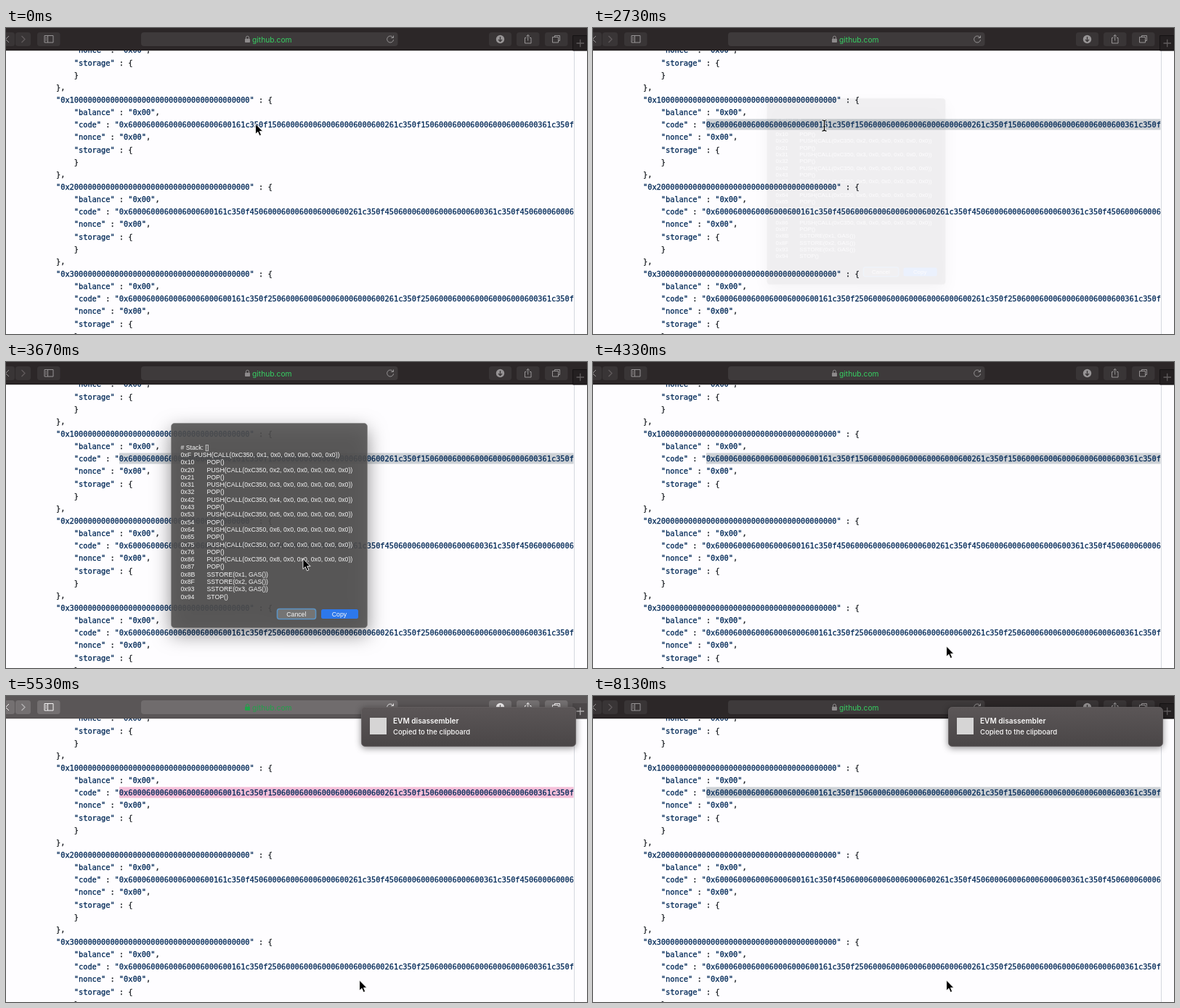
Recreate the animation shown at these times as an HTML page. Size 800 by 422 pixels, loop 8.19 s.

```html
<!DOCTYPE html>
<html lang="en">
<head>
<meta charset="utf-8">
<title>EVM disassembler</title>
<style>
html, body { margin: 0; width: 100%; height: 100%; overflow: hidden; background: #fefdff; }
svg { display: block; }
text { white-space: pre; }
svg {
  --bar: #2c2728; --button: #393536; --field: #3e3a3b; --icon: #979495; --edge: #151213;
  --faint: #605c5d; --url: #36cf62; --lock: #8d8a8b; --cell: #242021; --mark: #cdd1d5;
}
svg.active {
  --bar: #5a5657; --button: #747071; --field: #706c6d; --icon: #f6f4f5; --edge: #4b4748;
  --faint: #b5b2b3; --url: #22a14a; --lock: #22a14a; --cell: #4c4849; --mark: #f5bfd9;
}
.code { font: 10.3px "DejaVu Sans Mono", "Noto Sans Mono", monospace; fill: #1d2126; stroke: #1d2126; stroke-width: .3; }
.str { fill: #032a58; stroke: #032a58; }
.ui { font-family: Inter, "Liberation Sans", sans-serif; }
.asm { font: 8.71px "Liberation Sans", Arial, sans-serif; fill: #f7f7f7; }
.url { font-size: 10.28px; fill: var(--url); }
.btn { fill: var(--button); }
.line { fill: none; stroke: var(--icon); stroke-width: 1; }
.faint { fill: none; stroke: var(--faint); stroke-width: 1.3; }
#mark { fill: var(--mark); }
#dialog { filter: drop-shadow(0 9px 13px rgba(0,0,0,.5)); transform-origin: 362px 225px; }
#notice { filter: drop-shadow(0 2px 5px rgba(0,0,0,.45)); }
</style>
</head>
<body>
<svg id="stage" width="800" height="422" viewBox="0 0 800 422">
  <defs>
    <clipPath id="page"><rect y="31" width="781.500" height="391"/></clipPath>
    <linearGradient id="gray" x2="0" y2="1">
      <stop stop-color="#5b5657"/><stop offset="1" stop-color="#4a4647"/>
    </linearGradient>
    <path id="beamShape" d="M-2.800 -7.500Q0 -7.500 0 -5.500Q0 -7.500 2.800 -7.500M0 -5.500V5.500M-2.800 7.500Q0 7.500 0 5.500Q0 7.500 2.800 7.500M-1.500 1.500H1.500"/>
  </defs>
  <rect width="800" height="422" fill="#fefdff"/>
  <g clip-path="url(#page)">
    <rect id="mark" x="156" y="125.5" width="626" height="15"/>
    <g id="code" class="code"></g>
  </g>
  <path d="M782.5 31V422" stroke="#d5d8de"/>

  <g id="toolbar">
    <rect width="800" height="31" fill="var(--bar)"/>
    <path d="M780.5 31V10.5H800V31Z" fill="var(--cell)" stroke="var(--edge)"/>
    <path d="M0 30.7H800" stroke="var(--edge)" stroke-width="1"/>
    <g class="btn">
      <rect x="-12" y="6" width="24" height="19" rx="3.5"/>
      <rect x="13" y="6" width="21" height="19" rx="3.5"/>
      <rect x="43" y="6" width="31.500" height="19" rx="3.5"/>
      <rect x="665" y="6" width="31" height="19" rx="3.5"/>
      <rect x="703" y="6" width="31.500" height="19" rx="3.5"/>
      <rect x="742" y="6" width="31.500" height="19" rx="3.5"/>
    </g>
    <rect x="186" y="6" width="353.500" height="19" rx="4" fill="var(--field)"/>
    <path class="line" d="M4 11L-.5 15.500L4 20"/>
    <path class="faint" d="M21.500 11L26 15.500L21.500 20M785.500 21H796M790.700 15.700V26.300"/>
    <path class="line" d="M53 10.500H65V20H53ZM57.500 10.500V20M54.500 13H56M54.500 15H56M54.500 17H56"/>
    <circle cx="680.500" cy="15.500" r="5.700" fill="var(--icon)"/>
    <path d="M680.500 12V18M678 16L680.500 18.600L683 16" fill="none" stroke="var(--button)" stroke-width="1.300"/>
    <path class="line" d="M716.500 13.500H714.500V21H723V13.500H721M718.700 17.500V9.500M716.400 11.700L718.700 9.400L721 11.700"/>
    <path class="line" d="M755.500 12.500V10.500H762.500V17.500H760.500M752.500 12.500H760.500V20H752.500Z"/>
    <path class="line" d="M533 13.200A4.500 4.500 0 1 0 533.600 16.200M533.500 10.500V13.500H530.300"/>
    <rect x="329" y="14.800" width="7" height="5.200" rx=".8" fill="var(--lock)"/>
    <path d="M330.500 15V13.200A2 2 0 0 1 334.500 13.200V15" fill="none" stroke="var(--lock)"/>
    <text class="ui url" x="339" y="19.500">github.com</text>
  </g>

  <g id="dialog">
    <rect x="227.500" y="84.500" width="270" height="282" rx="4.500" fill="rgba(80,79,79,.88)" stroke="rgba(130,130,130,.6)"/>
    <g id="asm" class="asm"></g>
    <rect x="373.500" y="340.500" width="53" height="14" rx="3" fill="#747474" stroke="#5b93c4" stroke-width="1.600"/>
    <rect x="434" y="341" width="51" height="13" rx="2.500" fill="#2d78ec"/>
    <g class="asm" text-anchor="middle">
      <text x="399.800" y="350.600">Cancel</text>
      <text x="459" y="350.600">Copy</text>
    </g>
  </g>

  <g id="notice">
    <rect x="489.500" y="15.500" width="295" height="54" rx="5" fill="url(#gray)" stroke="#686364" stroke-width=".8"/>
    <rect x="501" y="30" width="23" height="23" fill="#d6d5d5"/>
    <g class="ui" fill="#fbfafa">
      <text x="533" y="38" font-size="10.080" font-weight="600">EVM disassembler</text>
      <text x="533" y="53.300" font-size="9.500" font-weight="500">Copied to the clipboard</text>
    </g>
  </g>

  <path id="arrow" d="M0 0V14.300L3.300 11.300L5.500 16.600L8 15.500L5.800 10.400H10.200Z" fill="#000" stroke="#fff" stroke-width=".9"/>
  <g id="beam" fill="none" stroke-linecap="round">
    <use href="#beamShape" stroke="#fff" stroke-width="2.600"/>
    <use href="#beamShape" stroke="#000" stroke-width="1.200"/>
  </g>
</svg>
<script>
const LOOP = 8190, LEFT = 69, CHAR = 6.2, LINE = 17.143;
const $ = id => document.getElementById(id);
const SVG = 'http://www.w3.org/2000/svg';

function addText(parent, x, y, str) {
  const el = document.createElementNS(SVG, 'text');
  el.setAttribute('x', x);
  el.setAttribute('y', y);
  parent.append(el);
  str.split(/("[^"]*"?)/).forEach(part => {
    if (!part) return;
    const span = document.createElementNS(SVG, 'tspan');
    if (part[0] === '"') span.setAttribute('class', 'str');
    span.textContent = part;
    el.append(span);
  });
}

// Bytecode: zero arguments, then a call with the running number.
function bytecode(zeros, op) {
  let s = '0x';
  for (let i = 1; i <= 8; i++) s += '6000'.repeat(zeros) + '600' + i + '61c350' + op + '50';
  return s.slice(0, 101);
}

function account(n, zeros, op) {
  return [
    `"0x${n}${'0'.repeat(39)}" : {`,
    '    "balance" : "0x00",',
    `    "code" : "${bytecode(zeros, op)}`,
    '    "nonce" : "0x00",',
    '    "storage" : {',
    '    }',
    '},'
  ];
}

[...account(0, 5, 'f1').slice(3), ...account(1, 5, 'f1'),
 ...account(2, 4, 'f4'), ...account(3, 5, 'f2')].forEach((row, i) => {
  const indent = row.search(/\S/);
  addText($('code'), LEFT + indent * CHAR, 34.4 + i * LINE, row.trim());
});

// Disassembly listing
const hex = n => '0x' + n.toString(16).toUpperCase();
const listing = [];
for (let k = 1; k <= 8; k++) {
  const at = 15 + 17 * (k - 1);
  listing.push([at, `PUSH(CALL(0xC350, ${hex(k)}${', 0x0'.repeat(5)}))`], [at + 1, 'POP()']);
}
for (let k = 1; k <= 3; k++) listing.push([0x87 + 4 * k, `SSTORE(${hex(k)}, GAS())`]);
listing.push([0x94, 'STOP()']);

addText($('asm'), 240.5, 120.6, '# Stack: []');
listing.forEach(([at, op], i) => {
  const y = 130.9 + i * 10.3;
  addText($('asm'), 240.5, y, hex(at));
  addText($('asm'), i ? 276.5 : 258.7, y, op);
});

// Cursor stops: time, x, y
const path = [
  [0, 343.5, 132], [350, 343.5, 132], [750, 318.5, 134.5], [3480, 318.5, 134.5],
  [3800, 459, 347], [3900, 459, 347], [4200, 486.7, 392], [LOOP, 486.7, 392]
];

const ramp = (t, a, b) => Math.min(1, Math.max(0, (t - a) / (b - a)));
const ease = p => p * p * (3 - 2 * p);
const within = (t, a, b) => t >= a && t < b;
const show = (el, on) => { el.style.display = on ? '' : 'none'; };

function cursorAt(t) {
  const i = path.findIndex(p => p[0] > t);
  const [t0, x0, y0] = path[i - 1], [t1, x1, y1] = path[i];
  const p = ease(ramp(t, t0, t1));
  return [x0 + (x1 - x0) * p, y0 + (y1 - y0) * p];
}

function draw(t) {
  $('stage').classList.toggle('active', within(t, 800, 2700) || within(t, 4470, 7400));
  show($('mark'), t >= 1130);

  const grow = ease(ramp(t, 2700, 2870));
  const fade = 1 - ramp(t, 3930, 4070);
  show($('dialog'), within(t, 2700, 4070));
  $('dialog').style.opacity = grow * fade;
  $('dialog').style.transform = `scale(${0.9 + 0.1 * grow})`;

  show($('notice'), t >= 4700);
  const slide = 1 - Math.pow(1 - ramp(t, 4700, 5060), 3);
  $('notice').setAttribute('transform', `translate(${320 * (1 - slide)} 0)`);

  const beam = within(t, 750, 3490);
  show($('beam'), beam);
  show($('arrow'), !beam);
  const [x, y] = cursorAt(t);
  $(beam ? 'beam' : 'arrow').setAttribute('transform', `translate(${x} ${y})`);
}

const start = performance.now();
function tick() {
  draw((performance.now() - start) % LOOP);
  requestAnimationFrame(tick);
}
tick();
</script>
</body>
</html>
```
